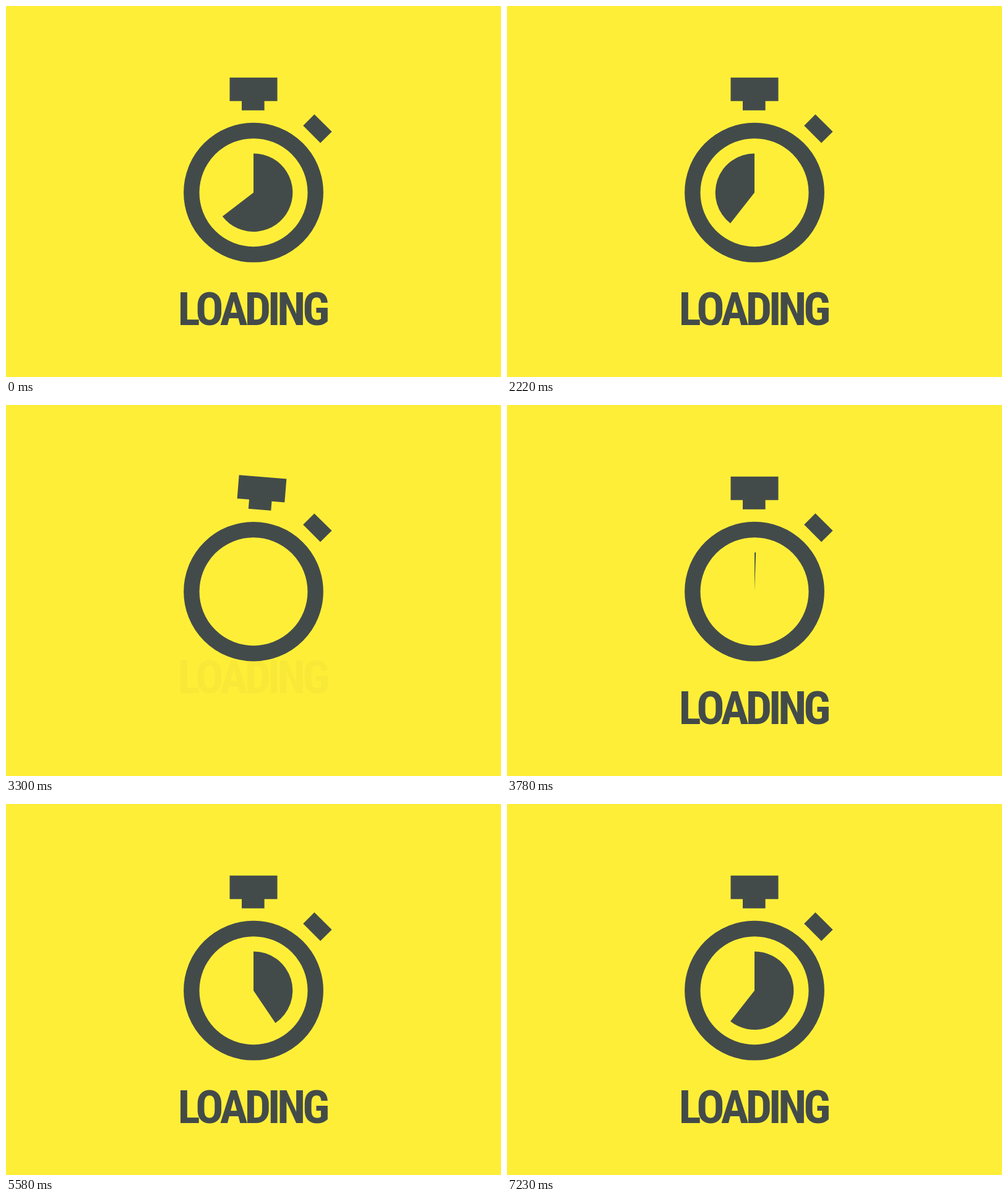
Animation of 800 by 600 pixels, one loop 7.26 s. Source, as an HTML page:

```html
<!DOCTYPE html>
<html lang="en">
<head>
<meta charset="utf-8">
<title>Loading</title>
<style>
  html, body { margin: 0; width: 100%; height: 100%; overflow: hidden; background: #ffee38; }
  svg { display: block; width: 100vw; height: 100vh; fill: #434b4a; }
  text {
    font: 700 75px "Roboto Condensed", "Open Sans Condensed", Roboto, "Open Sans", sans-serif;
    font-stretch: condensed;
    letter-spacing: -5px;
    text-anchor: middle;
  }
</style>
</head>
<body>
<svg viewBox="0 0 800 600">
  <text id="label" x="398" y="516">LOADING</text>
  <g id="watch">
    <circle r="100.2" fill="none" stroke="#434b4a" stroke-width="25.4"/>
    <path id="crown" d="M-38.5-186h77v38h-20.9v15h-36.6v-15h-19.5z"/>
    <path id="button"/>
    <path id="pie"/>
  </g>
</svg>
<script>
const STEP = 30, TOTAL = 242, SWEEP = 25;
const FILL_START = 125.86, SWEEPS = 8;
const EXIT = 83.9, ENTER = 97;
const PIE_R = 63.3, PRESS_DEPTH = 5.6, PRESS_HALF = 5;

const $ = id => document.getElementById(id);
const label = $('label'), watch = $('watch'), crown = $('crown');
const button = $('button'), pie = $('pie');

const mod = (a, n) => ((a % n) + n) % n;
const progress = (f, from, to) => Math.min(1, Math.max(0, (f - from) / (to - from)));
const inOut = p => p < 0.5 ? 2 * p * p : 1 - 2 * (1 - p) ** 2;

function sector(from, to) {
  if (to - from < 1e-3) return '';
  const point = turn => {
    const a = turn * 2 * Math.PI;
    return `${(PIE_R * Math.sin(a)).toFixed(2)} ${(-PIE_R * Math.cos(a)).toFixed(2)}`;
  };
  const end = Math.min(to, from + 0.9999);
  return `M0 0L${point(from)}A${PIE_R} ${PIE_R} 0 ${end - from > 0.5 ? 1 : 0} 1 ${point(end)}Z`;
}

function drawDial(f) {
  const c = mod(f - FILL_START, TOTAL);
  const n = Math.floor(c / SWEEP), p = c / SWEEP - n;
  const running = n < SWEEPS;
  pie.setAttribute('d', !running ? '' : n % 2 ? sector(p, 1) : sector(0, p));

  // The button dips each time the pie becomes full.
  const sinceFull = mod(c, 2 * SWEEP) - SWEEP;
  const press = running ? Math.max(0, 1 - Math.abs(sinceFull) / PRESS_HALF) : 0;
  const d = PRESS_DEPTH * Math.sin(press * Math.PI / 2) / Math.SQRT2;
  button.setAttribute('d',
    `M${98.4 - d} ${-126.4 + d}L${126.6 - d} ${-98.4 + d}L108.1-80.2L80.2-108.2Z`);
}

function drawBody(f) {
  let scale, turn;
  if (f < ENTER) {
    const u = progress(f, EXIT, ENTER) ** 3;
    scale = 1 - u;
    turn = -280 * u;
  } else {
    const q = 1 - progress(f, ENTER, ENTER + 15.5);
    scale = 1 - q ** 4;
    turn = -300 * (1.9 * q ** 3 - 0.9 * q * q);
  }
  watch.setAttribute('transform', `translate(400 301.7) scale(${scale})`);
  crown.setAttribute('transform', `rotate(${turn})`);
}

function drawLabel(f) {
  const shown = f < ENTER || f > 126
    ? 1 - inOut(f < ENTER ? progress(f, EXIT, ENTER) : 0)
    : inOut(progress(f, 107.7, 126));
  label.setAttribute('transform', `translate(0 ${-52 * (1 - shown)})`);
  label.setAttribute('opacity', shown);
}

function render(ms) {
  const f = Math.floor(ms / STEP) % TOTAL;
  drawDial(f);
  drawBody(f);
  drawLabel(f);
}

const start = performance.now();
function tick() {
  render(performance.now() - start);
  requestAnimationFrame(tick);
}
tick();
</script>
</body>
</html>
```
